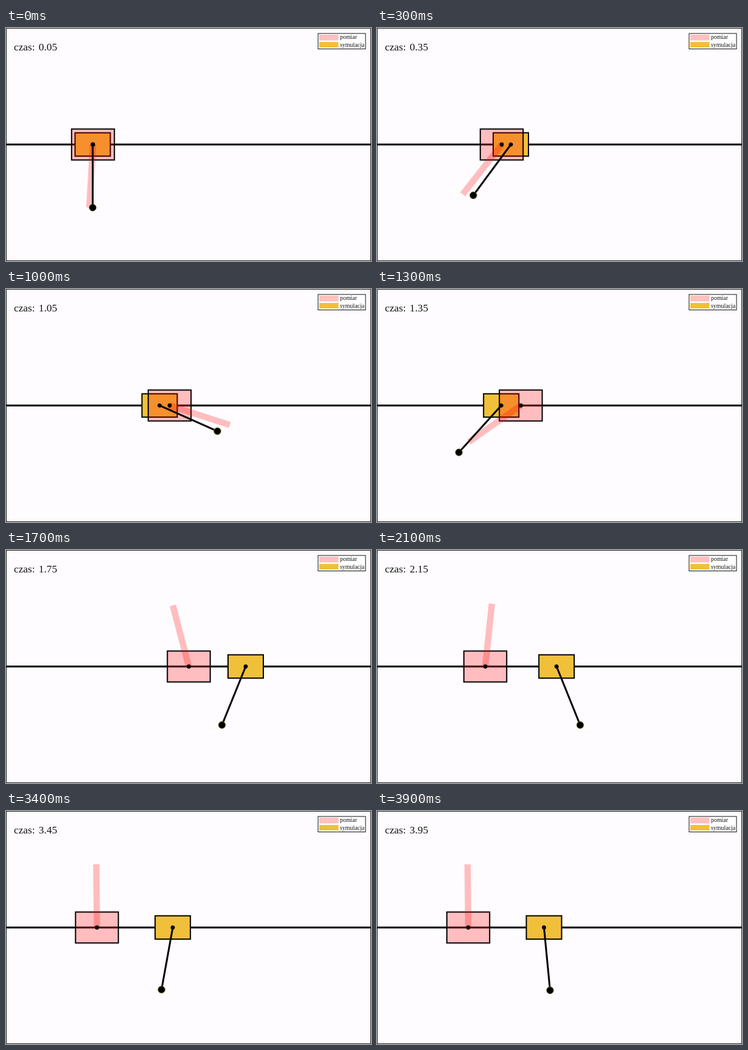
An HTML page for the animation above (4 s loop, 600 px wide and 384 px high).

```html
<!DOCTYPE html>
<html lang="pl">
<head>
<meta charset="utf-8">
<title>Wahadło na wózku</title>
<style>
  html, body { margin: 0; width: 100%; height: 100%; overflow: hidden; background: #fefcfe; }
  svg { display: block; }
  text { font-family: "Liberation Serif", serif; fill: #111; }
  .clock { font-size: 17.3px; word-spacing: 2px; }
  .legend { font-size: 9.9px; }
  .outline { stroke: #000; stroke-width: 2; }
  .measured { fill: #f00; fill-opacity: .25; }
  .simulated { fill: #f1c03a; }
</style>
</head>
<body>
<svg width="600" height="384" viewBox="0 0 600 384">
  <rect width="600" height="384" fill="#fefcfe"/>
  <path d="M0 192H600" stroke="#000" stroke-width="3"/>
  <rect id="simCart" class="simulated outline" x="-29" y="-19.3" width="58" height="38.5"/>
  <rect id="realCart" class="measured outline" x="-35.2" y="-25.5" width="70.4" height="51"/>
  <rect id="realRod" class="measured" x="-5.2" y="0" width="10.4" height="104"/>
  <circle id="realPivot" r="3.4"/>
  <g id="simRod">
    <path d="M0 0V104" stroke="#000" stroke-width="3"/>
    <circle r="3.4"/>
    <circle cy="104" r="5.8" stroke="#77752a" stroke-width=".8"/>
  </g>
  <text id="clock" class="clock" x="13" y="37"></text>
  <rect x="513" y="9" width="78" height="25.5" fill="#fff" stroke="#111"/>
  <rect class="measured" x="515" y="11" width="31.5" height="9.5"/>
  <rect class="simulated" x="515" y="23" width="31.5" height="9"/>
  <text class="legend" x="549" y="18.3">pomiar</text>
  <text class="legend" x="549" y="30.5">symulacja</text>
  <rect x=".5" y=".5" width="599" height="383" fill="none" stroke="#222"/>
</svg>
<script>
const LOOP = 4000, STEP = 100, RAIL = 192;
const $ = id => document.getElementById(id);

// [seconds, value]: cart positions in px, rod angles in degrees from hanging
const realX = [[0, 143], [.1, 146], [.3, 205], [.6, 344.5], [.7, 360], [.8, 345], [1, 269],
  [1.2, 222], [1.4, 262], [1.6, 305], [1.7, 300.5], [1.9, 232], [2.1, 178], [2.3, 160],
  [2.6, 155.5], [3.1, 150], [3.9, 150]];
const realAngle = [[0, -3.3], [.1, -7], [.3, -38], [.4, -47], [.6, -27], [.8, 38], [1, 72],
  [1.1, 58], [1.2, 10], [1.3, -55], [1.4, -105], [1.5, -138], [1.6, -156], [1.7, -165.4],
  [1.9, -180], [2.1, -186], [2.3, -182], [2.6, -178.6], [3.4, -179.4], [3.9, -179.4]];
const simX = [[0, 142.5], [.1, 146], [.3, 220], [.6, 408], [.7, 428], [.8, 408], [1, 252.5],
  [1.2, 175], [1.4, 255], [1.7, 394], [1.8, 385], [2, 318], [2.2, 280], [2.4, 274.5], [3.9, 274.5]];
const simSwing = [[0, 0], [.1, -5], [.2, -20], [.4, -46], [.6, -21], [.8, 44], [1, 66],
  [1.1, 47], [1.2, 3], [1.3, -42], [1.45, -72], [1.6, -52], [1.7, -22], [1.8, 16],
  [1.9, 33], [2, 30], [2.2, 12.9]];

function slope(keys, i) {
  const a = keys[Math.max(i - 1, 0)], b = keys[Math.min(i + 1, keys.length - 1)];
  return (b[1] - a[1]) / (b[0] - a[0]);
}

// Cubic Hermite curve through the keys
function curve(keys, t) {
  let i = 0;
  while (i < keys.length - 2 && t > keys[i + 1][0]) i++;
  const [t0, a] = keys[i], [t1, b] = keys[i + 1];
  const d = t1 - t0, u = Math.min((t - t0) / d, 1), v = 1 - u;
  return v * v * (1 + 2 * u) * a + u * u * (3 - 2 * u) * b
    + u * v * d * (v * slope(keys, i) - u * slope(keys, i + 1));
}

// Once the cart has stopped, the rod swings freely with light damping
function simAngle(t) {
  if (t < 2.2) return curve(simSwing, t);
  const s = t - 3.38;
  return -10.4 * Math.exp(-.2 * s) * Math.cos(2 * Math.PI * s / .8);
}

function place(id, x, angle = 0) {
  $(id).setAttribute("transform", `translate(${x} ${RAIL}) rotate(${-angle})`);
}

function draw(now) {
  const t = Math.floor(now % LOOP / STEP) * STEP / 1000;
  const real = curve(realX, t), sim = curve(simX, t);
  place("realCart", real);
  place("realPivot", real);
  place("realRod", real, curve(realAngle, t));
  place("simCart", sim);
  place("simRod", sim, simAngle(t));
  $("clock").textContent = "czas: " + (t + .05).toFixed(2);
}

const start = performance.now();
function tick() {
  draw(performance.now() - start);
  requestAnimationFrame(tick);
}
tick();
</script>
</body>
</html>
```
